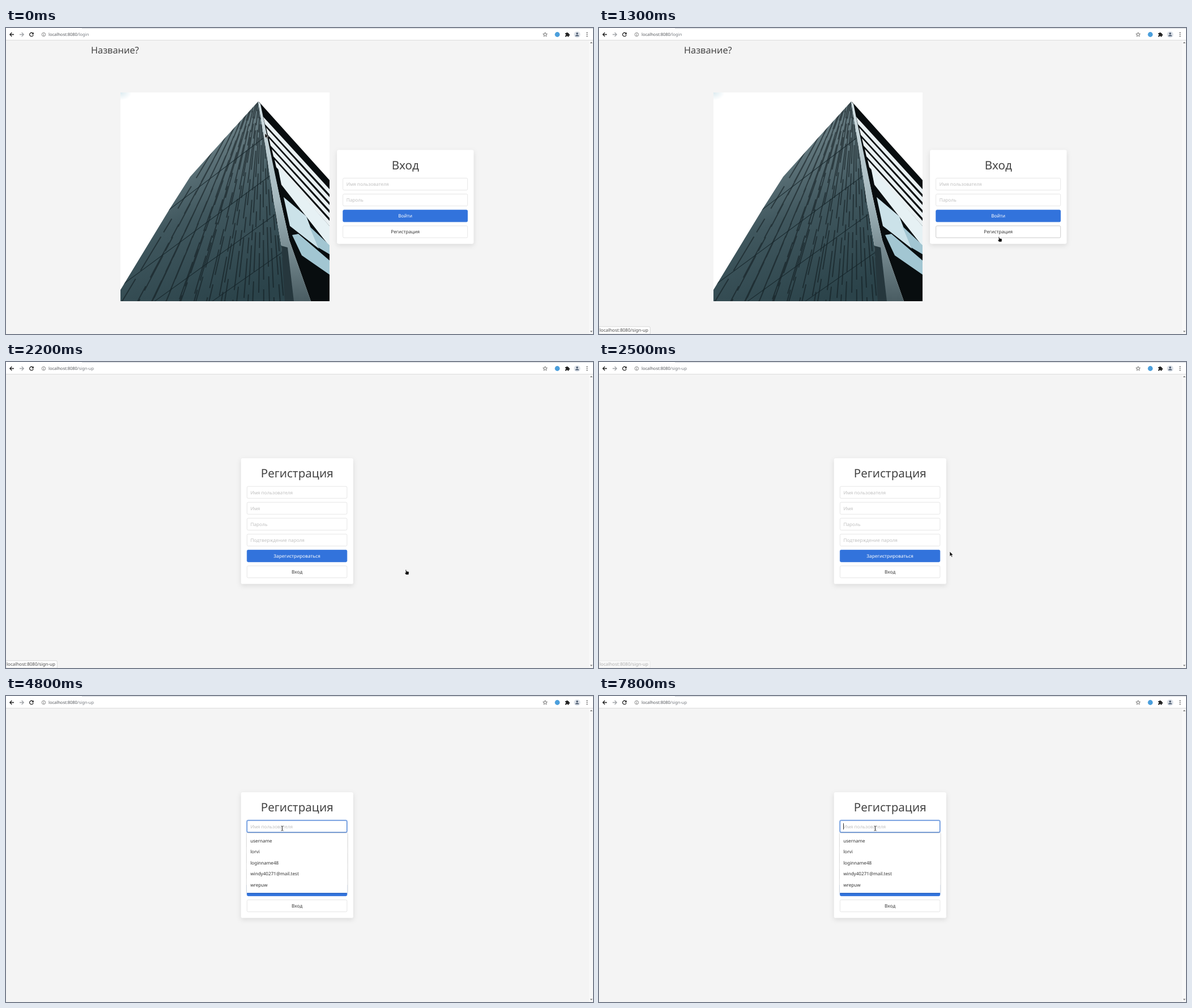
Recreate the animation shown at these times as an HTML page. Size 1036 by 541 pixels, loop 8 s.

```html
<!DOCTYPE html>
<html lang="ru">
<head>
<meta charset="utf-8">
<title>Вход</title>
<style>
html, body { margin: 0; width: 100%; height: 100%; overflow: hidden; background: #f4f4f4; }
svg { display: block; width: 1036px; height: 541px; }
text { font-family: "Noto Sans", "Open Sans", sans-serif; font-size: 8.2px; fill: #363636; text-rendering: geometricPrecision; white-space: pre; }
.mid { text-anchor: middle; }
.title { font-size: 20.6px; fill: #444; }
.hint { fill: #c0c0c0; }
.url { font-size: 7.5px; fill: #55585c; }
.path { fill: #777b80; }
.option { font-size: 8.1px; fill: #333; }
.box { fill: #fff; stroke: #dbdbdb; stroke-width: .7; }
.card { fill: #fff; stroke: rgba(10,10,10,.02); filter: drop-shadow(0 3.5px 4px rgba(10,10,10,.1)); }
.line { fill: none; stroke: #222; stroke-width: 1.3; }
</style>
</head>
<body>
<svg viewBox="0 0 1036 541">
  <defs>
    <linearGradient id="wall" gradientUnits="userSpaceOnUse" x1="330" y1="220" x2="430" y2="470">
      <stop offset="0" stop-color="#64797f"/>
      <stop offset=".4" stop-color="#40575e"/>
      <stop offset="1" stop-color="#2b434a"/>
    </linearGradient>
    <linearGradient id="corner" x1="0" y1="0" x2="0" y2="1">
      <stop offset="0" stop-color="#d5e2e6"/>
      <stop offset=".5" stop-color="#a3b7bd"/>
      <stop offset="1" stop-color="#495c62"/>
    </linearGradient>
    <radialGradient id="haze" cx="0" cy="0" r="1">
      <stop offset="0" stop-color="#dcebf0"/>
      <stop offset="1" stop-color="#fff"/>
    </radialGradient>
    <clipPath id="wallClip"><path d="M445 130L385 196L325 263L290 318L202 463V483H495L486 385L472 303L458 210Z"/></clipPath>
    <clipPath id="sideClip"><path d="M446 130L571 269V483H538L500 375L484 303Z"/></clipPath>
  </defs>

  <rect width="1036" height="541" fill="#f4f4f4"/>
  <rect x="1029" y="22" width="7" height="519" fill="#f8f8f8"/>
  <path d="M1030.800 27L1033 24.600L1035.200 27ZM1030.800 535.500L1033 537.900L1035.200 535.500Z" fill="#777"/>

  <g id="toolbar">
    <rect width="1036" height="21" fill="#fff"/>
    <rect x="134" width="902" height="1.300" fill="#dadde2"/>
    <rect y="21" width="1036" height="1" fill="#dcdcdc"/>
    <path class="line" d="M14 11.500H7M10.300 8L6.800 11.500L10.300 15"/>
    <path class="line" style="stroke:#a0a3a7" d="M24 11.500H31M27.700 8L31.200 11.500L27.700 15"/>
    <path class="line" d="M47.500 9.400A3.300 3.300 0 1 0 48.200 12.300"/>
    <path d="M48.800 7.600V11.200H45.200Z" fill="#222"/>
    <circle class="line" style="stroke:#666;stroke-width:.8" cx="66.500" cy="11.500" r="3.200"/>
    <path d="M66.500 9.500V10.400M66.500 11.200V13.500" stroke="#666" stroke-width=".9"/>
    <path id="star" class="line" style="stroke:#555;stroke-width:.8"/>
    <circle cx="973" cy="11.500" r="4.400" fill="#4b9fdc"/>
    <path d="M987 9H989A1.300 1.300 0 1 1 991.600 9H993.400V11A1.300 1.300 0 1 1 993.400 13.500V15.500H991.500A1.300 1.300 0 0 0 988.900 15.500H987V13.400A1.300 1.300 0 0 0 987 10.800Z" fill="#222"/>
    <circle cx="1008" cy="11.500" r="5.600" fill="#dce1e8"/>
    <circle cx="1008" cy="9.700" r="1.700" fill="#46566b"/>
    <path d="M1004.700 14.600Q1005 12.200 1008 12.200T1011.300 14.600Z" fill="#46566b"/>
    <path d="M1025.500 8.400V8.410M1025.500 11.500V11.510M1025.500 14.600V14.610" stroke="#333" stroke-width="1.700" stroke-linecap="round"/>
    <text class="url" x="75" y="14.200">localhost:8080<tspan class="path" id="route">/login</tspan></text>
  </g>

  <g id="login">
    <text x="150" y="45.300" style="font-size:16.250px;fill:#444">Название?</text>
    <g id="photo">
      <rect x="202" y="114" width="369" height="369" fill="#fff"/>
      <rect x="202" y="114" width="20" height="14" fill="url(#haze)"/>
      <g clip-path="url(#wallClip)">
        <rect x="202" y="114" width="300" height="369" fill="url(#wall)"/>
        <path id="slats" fill="none" stroke="#10191c" stroke-opacity=".55" stroke-width="2" stroke-dasharray="46 17 70 9 28 21"/>
        <path id="floors" fill="none" stroke="#16252a" stroke-opacity=".8" stroke-width="1.200"/>
      </g>
      <g clip-path="url(#sideClip)">
        <rect x="440" y="125" width="131" height="358" fill="#080d0f"/>
        <path id="panes" fill="#e9f0f2"/>
        <path d="M480 247L571 350V386L486 277Z" fill="#e6f1f4"/>
        <path d="M490 299L530 333L552 390L501 350Z" fill="#cbe2e9"/>
        <path d="M535 350L571 384V400L551 388ZM505 366L516 364L571 411V436L522 402Z" fill="#a2c6d2"/>
      </g>
      <path d="M445 130L449 134L484 303L500 375L538 483H495L486 385L472 303L458 210Z" fill="url(#corner)"/>
      <path d="M486 385L497 388L508 483H492Z" fill="#26373d"/>
    </g>
    <rect class="card" x="584" y="215.300" width="241.600" height="166.500" rx="3.200"/>
    <text class="title mid" x="704.800" y="249.700">Вход</text>
  </g>

  <g id="signup">
    <rect class="card" x="414.600" y="170" width="198.400" height="222.600" rx="3.200"/>
    <text class="title mid" x="513.700" y="204.300">Регистрация</text>
  </g>

  <g id="menu">
    <rect x="425" y="219.700" width="177" height="21.600" rx="2.200" fill="none" stroke="#3273dc" stroke-opacity=".25" stroke-width="2.200"/>
    <rect x="425.300" y="220" width="176.400" height="21" rx="2.100" fill="none" stroke="#3b78d6" stroke-width="1"/>
    <rect id="caret" x="431" y="225" width="1" height="11" fill="#333"/>
    <rect x="425" y="242.300" width="177.500" height="105.700" fill="#fff" style="filter:drop-shadow(0 .6px 1.200px rgba(0,0,0,.35))"/>
  </g>

  <g id="status">
    <path d="M0 528H88Q90.300 528 90.300 530.300V541H0Z" fill="#fff" stroke="#cfcfcf" stroke-width=".8"/>
    <text x="1" y="537.300" style="font-size:8.050px;fill:#4a4a4a">localhost:8080/sign-up</text>
  </g>

  <g id="pointer">
    <path id="arrow" d="M0 0V8.600L2 6.800L3.400 9.900L4.900 9.300L3.500 6.300H6.100Z" fill="#111" stroke="#fff" stroke-width=".6"/>
    <path id="hand" d="M-1 .8Q-.8 -.2 .1 .1L1.100 3L4 3.400Q5.300 3.700 5.200 5L4.700 9H-.2L-2 6.200Q-2.300 5 -1.200 5.200L-.3 5.500Z" fill="#0b0b0b" stroke="#fff" stroke-width=".5"/>
    <g id="beam" fill="none">
      <path d="M-2 -4Q-.3 -4 0 -3.300Q.3 -4 2 -4M0 -3.300V3.300M-2 4Q-.3 4 0 3.300Q.3 4 2 4" stroke="#fff" stroke-width="2"/>
      <path d="M-2 -4Q-.3 -4 0 -3.300Q.3 -4 2 -4M0 -3.300V3.300M-2 4Q-.3 4 0 3.300Q.3 4 2 4" stroke="#222" stroke-width="1"/>
    </g>
  </g>
</svg>
<script>
const LOOP = 8000, ROW = 28.1, HEIGHT = 21.8;
const $ = id => document.getElementById(id);
const show = (id, on) => { $(id).style.display = on ? '' : 'none'; };

function add(parent, tag, attrs, text) {
  const el = document.createElementNS('http://www.w3.org/2000/svg', tag);
  for (const key in attrs) el.setAttribute(key, attrs[key]);
  if (text) el.textContent = text;
  $(parent).append(el);
  return el;
}

// Text fields first, then the primary button, then the secondary one.
function addForm(parent, x, y, width, hints, primary, secondary) {
  const box = row => add(parent, 'rect', {
    class: 'box', x: x + .35, y: y + row * ROW + .35,
    width: width - .7, height: HEIGHT - .7, rx: 2.1
  });
  const label = (row, text, color) => add(parent, 'text', {
    class: 'mid', x: x + width / 2, y: y + row * ROW + 14, style: `fill:${color}`
  }, text);
  hints.forEach((hint, row) => {
    box(row);
    add(parent, 'text', { class: 'hint', x: x + 6.4, y: y + row * ROW + 14 }, hint);
  });
  const row = hints.length;
  box(row).setAttribute('style', 'fill:#3273dc;stroke:#3273dc');
  label(row, primary, '#fff');
  const button = box(row + 1);
  label(row + 1, secondary, '#363636');
  return button;
}

const registerButton = addForm('login', 594.3, 265.1, 220.7,
  ['Имя пользователя', 'Пароль'], 'Войти', 'Регистрация');
addForm('signup', 425, 219.6, 177.2,
  ['Имя пользователя', 'Имя', 'Пароль', 'Подтверждение пароля'], 'Зарегистрироваться', 'Вход');

['username', 'lorvi', 'loginname48', 'windy40271@mail.test', 'wrepuw'].forEach((name, i) =>
  add('menu', 'text', { class: 'option', x: 431.2, y: 258.5 + i * 19.5 }, name));

const lines = (count, line) => Array.from({ length: count }, (_, i) => line(i)).join('');
$('slats').setAttribute('d', lines(30, i => `M${205 + i * 10} ${483 + i * 37 % 60}L${438 + i * .6} 95`));
$('floors').setAttribute('d', lines(4, i => `M200 ${388 + i * 70}L500 ${160 + i * 76}`));
$('panes').setAttribute('d', lines(5, i => {
  const x = 454 + i * 5, y = 157 + i * 19;
  return `M${x} ${y}L571 ${y + 128 - i * 5}V${y + 137 - i * 5}L${x + 3} ${y + 13}Z`;
}));
$('star').setAttribute('d', lines(10, i => {
  const r = i % 2 ? 1.7 : 4, a = (i / 5 - .5) * Math.PI;
  return `${i ? 'L' : 'M'}${951.5 + r * Math.cos(a)} ${11.7 + r * Math.sin(a)}`;
}) + 'Z');

// Each stop holds until the next one: time, x, y, shape.
const stops = [
  [0, 457, 186, 'arrow'], [200, 462, 200, 'arrow'], [300, 490, 265, 'arrow'],
  [400, 545, 380, 'arrow'], [500, 610, 480, 'arrow'], [600, 660, 525, 'arrow'],
  [700, 700, 512, 'arrow'], [800, 718, 477, 'arrow'], [900, 719, 418, 'arrow'],
  [1000, 713, 367, 'hand'], [1100, 709, 362, 'hand'], [1200, 707, 366, 'hand'],
  [1300, 706, 369, 'hand'], [1600, 705, 369, 'hand'], [1700, 706, 368, 'hand'],
  [1900, 706, 367, 'hand'], [2400, 665, 350, 'arrow'], [2500, 619, 335, 'arrow'],
  [3400, 486.5, 233.5, 'beam'], [3500, 487, 234, 'beam'], [3600, 487.5, 234, 'beam']
];

function statusAlpha(t) {
  if (t < 1200 || t >= 3400) return 0;
  if (t < 1300) return .5;
  return t < 2400 ? 1 : t < 2500 ? .75 : .4;
}

function draw() {
  const t = performance.now() % LOOP;
  const registering = t >= 2200;
  show('login', !registering);
  show('signup', registering);
  show('menu', t >= 3400);
  show('caret', t < 3600 || Math.floor((t - 3600) / 600) % 2 === 1);
  $('route').textContent = registering ? '/sign-up' : '/login';
  $('status').style.opacity = statusAlpha(t);
  registerButton.style.stroke = t < 1000 ? '#dbdbdb' : t < 1900 ? '#b5b5b5' : '#4a4a4a';

  const [, x, y, shape] = stops.filter(stop => stop[0] <= t).pop();
  $('pointer').setAttribute('transform', `translate(${x} ${y})`);
  for (const id of ['arrow', 'hand', 'beam']) show(id, id === shape);
  requestAnimationFrame(draw);
}
draw();
</script>
</body>
</html>
```
